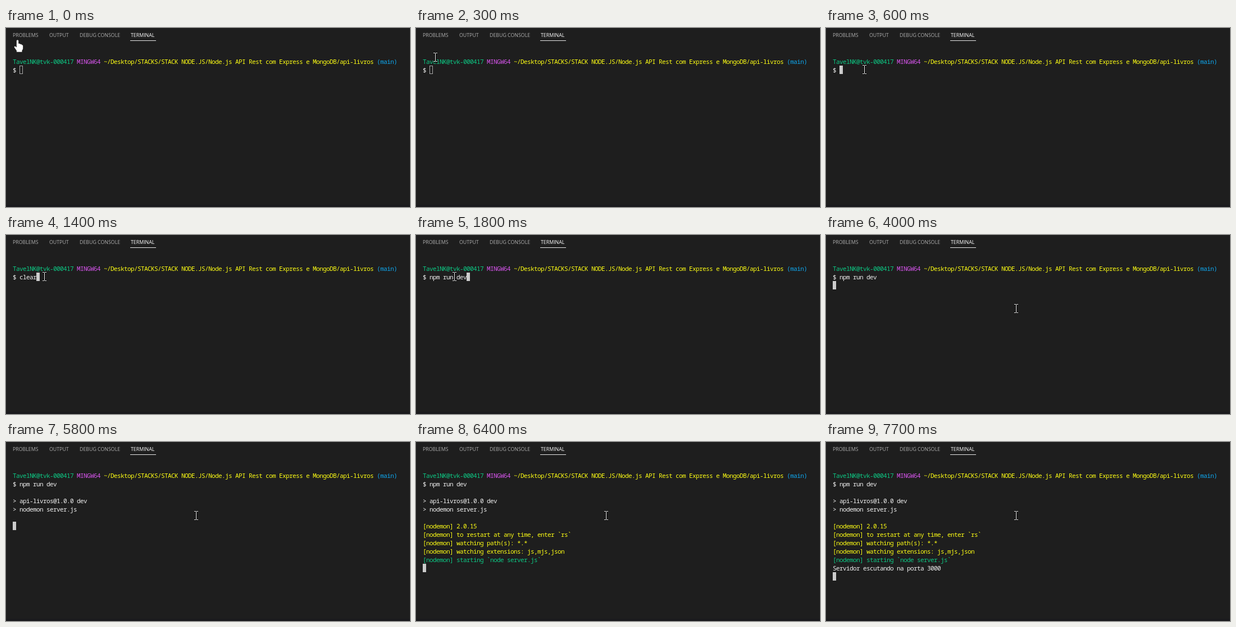
An HTML page that plays this animation: 719x319 px, repeating every 8000 ms.

```html
<!DOCTYPE html>
<html lang="en">
<head>
<meta charset="utf-8">
<title>Terminal</title>
<style>
  html, body { margin: 0; width: 100%; height: 100%; overflow: hidden; background: #1e1e1e; }
  #stage { position: relative; width: 719px; height: 319px; overflow: hidden; background: #1e1e1e; }
  #stage > * { position: absolute; }
  .tab { top: 6px; font: 8.8px/14px "Open Sans", "Noto Sans", sans-serif; color: #b0b0b0; white-space: pre; }
  .tab.on { color: #fff; font-weight: 500; }
  #underline { left: 221px; top: 22px; width: 46px; height: 1px; background: #e7e7e7; }
  #edge { left: 0; top: 315px; width: 719px; height: 4px; background: #1a1a1d; }
  .row { left: 12px; height: 15px; font: 500 11px/15px "Noto Sans Mono", "DejaVu Sans Mono", monospace;
         letter-spacing: -.6px; font-variant-ligatures: none; white-space: pre; color: #f2f2f2; }
  .g { color: #0dca85; } .m { color: #d955ee; } .y { color: #ffff14; } .b { color: #0fa8f0; }
  #caret { width: 6px; height: 15px; box-sizing: border-box; border: 1px solid #a8a8a8; }
  #caret.full { background: #ccc; border-color: #ccc; }
  #mouse { left: 0; top: 0; overflow: visible; }
</style>
</head>
<body>
<div id="stage">
  <div class="tab" style="left:12px">PROBLEMS</div>
  <div class="tab" style="left:77px">OUTPUT</div>
  <div class="tab" style="left:131px">DEBUG CONSOLE</div>
  <div class="tab on" style="left:222px">TERMINAL</div>
  <div id="underline"></div>
  <div id="edge"></div>
  <div id="caret"></div>
  <svg id="mouse" width="719" height="319">
    <g id="hand">
      <path d="M-2 2Q-2 0 0 0T2 2V6.5Q4 6 5 7.5Q6.8 7 7.7 8.7Q10 8.6 10 11V15Q10 17.5 8.3 19V22H-1.8V19.5L-6 13.4Q-6.4 11 -4.2 11.2L-2 13Z" fill="#fff" stroke="#111" stroke-width=".6"/>
    </g>
    <g id="arrow">
      <path d="M0 0V16L3.7 12.5L6.2 18.3L8.6 17.2L6.1 11.6H11Z" fill="#fff" stroke="#111" stroke-width=".8"/>
    </g>
    <g id="beam" fill="none">
      <path d="M-3 -7.5H0M1 -7.5H4M.5 -7V7M-3 7.5H0M1 7.5H4" stroke="#000" stroke-width="2.6"/>
      <path d="M-3 -7.5H0M1 -7.5H4M.5 -7V7M-3 7.5H0M1 7.5H4" stroke="#fff"/>
    </g>
  </svg>
</div>
<script>
const LOOP = 8000, TOP = 52, LEFT = 12, LINE = 15, CELL = 6;
const $ = id => document.getElementById(id);

// [start, end, row, [class, text]...]
const lines = [
  [0, LOOP, 0, ["g", "TavelNK@tvk-000417 "], ["m", "MINGW64 "],
    ["y", "~/Desktop/STACKS/STACK NODE.JS/Node.js API Rest com Express e MongoDB/api-livros "], ["b", "(main)"]],
  [0, LOOP, 1, ["", "$"]],
  [1400, 1800, 1, ["", "  clear"]],
  [1800, LOOP, 1, ["", "  npm run dev"]],
  [5800, LOOP, 3, ["", "> api-livros@1.0.0 dev"]],
  [5800, LOOP, 4, ["", "> nodemon server.js"]],
  [6400, LOOP, 6, ["y", "[nodemon] 2.0.15"]],
  [6400, LOOP, 7, ["y", "[nodemon] to restart at any time, enter `rs`"]],
  [6400, LOOP, 8, ["y", "[nodemon] watching path(s): *.*"]],
  [6400, LOOP, 9, ["y", "[nodemon] watching extensions: js,mjs,json"]],
  [6400, LOOP, 10, ["g", "[nodemon] starting `node server.js`"]],
  [7700, LOOP, 11, ["", "Servidor escutando na porta 3000"]]
];

// [start, column, row, focused]
const carets = [
  [0, 2, 1, false], [600, 2, 1, true], [1400, 7, 1, true], [1800, 13, 1, true],
  [3000, 0, 2, true], [5800, 0, 6, true], [6400, 0, 11, true], [7700, 0, 12, true]
];

// [start, shape, x, y]
const moves = [
  [0, "hand", 20.5, 21], [100, "hand", 21.5, 23], [200, "arrow", 25, 32],
  [300, "beam", 34, 52], [400, "beam", 50, 64], [500, "beam", 62, 72], [600, "beam", 68, 74],
  [3600, "beam", 150, 96], [3700, "beam", 280, 124], [3800, "beam", 336, 131], [4000, "beam", 338, 131]
];

const rows = lines.map(([from, to, row, ...parts]) => {
  const el = document.createElement("div");
  el.className = "row";
  el.style.top = TOP + row * LINE + "px";
  for (const [cls, text] of parts) {
    const span = document.createElement("span");
    span.className = cls;
    span.textContent = text;
    el.append(span);
  }
  $("stage").insertBefore(el, $("mouse"));
  return { el, from, to };
});

const at = (table, t) => table.filter(step => step[0] <= t).pop();

function draw(t) {
  for (const { el, from, to } of rows) el.style.visibility = t >= from && t < to ? "visible" : "hidden";

  const [, col, row, focused] = at(carets, t);
  $("caret").style.left = LEFT + col * CELL + "px";
  $("caret").style.top = TOP + row * LINE + "px";
  $("caret").className = focused ? "full" : "";

  const [, shape, x, y] = at(moves, t);
  for (const id of ["hand", "arrow", "beam"]) {
    $(id).style.display = id === shape ? "" : "none";
  }
  $(shape).setAttribute("transform", `translate(${x} ${y})`);
}

const start = performance.now();
function tick() {
  draw((performance.now() - start) % LOOP);
  requestAnimationFrame(tick);
}
tick();
</script>
</body>
</html>
```
